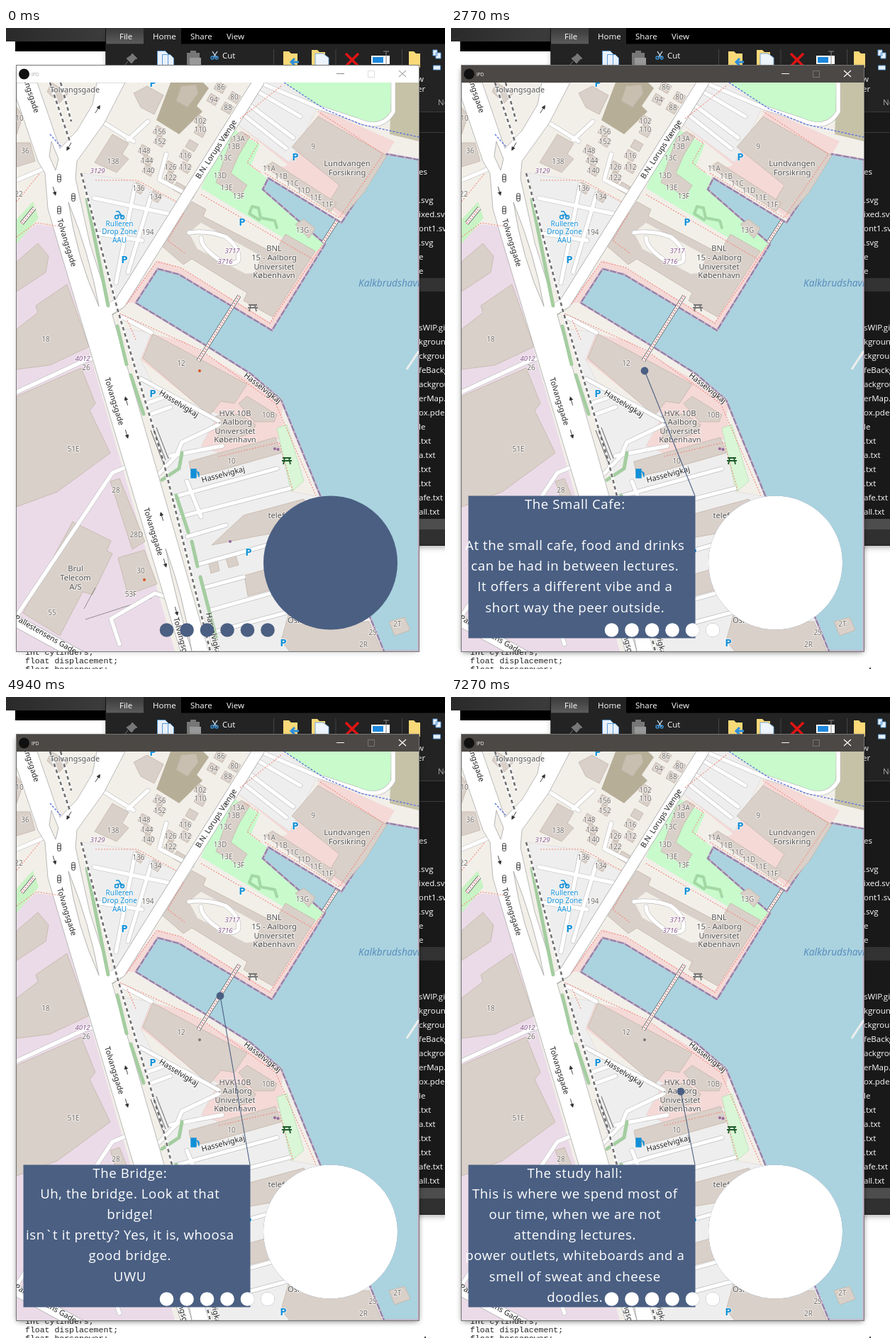
Recreate the animation shown at these times as an HTML page. Size 619 px wide and 905 px high, loop 8000 ms.

```html
<!DOCTYPE html>
<html lang="en">
<head>
<meta charset="utf-8">
<title>IPD</title>
<style>
html,body{margin:0;width:100%;height:100%;overflow:hidden;background:#fff}
svg{display:block;width:100vw;height:100vh;font-family:"Noto Sans","Open Sans",sans-serif}
.ui{font-family:"Open Sans","Noto Sans",sans-serif;font-size:11.5px;fill:#fff}
.mono{font:11.5px "Liberation Mono",monospace;fill:#222}
.b{fill:#d9d0c9;stroke:#c4b5a9;stroke-width:.8}
.park{fill:#eee;stroke:#ddd6d6;stroke-width:.6}
.pink{fill:#f4d9d7}
.line{fill:none;stroke-linejoin:round;stroke-linecap:round}
.foot{fill:none;stroke:#f3897d;stroke-width:1.1;stroke-dasharray:2 2}
.lbl text{text-anchor:middle;paint-order:stroke;stroke:#ffffffa0;stroke-width:2px;stroke-linejoin:round}
.num{font-size:10px;fill:#75706c}
.name{font-size:11.2px;fill:#555}
.street{font-size:10.8px;fill:#222}
.p{font-size:15px;font-weight:600;fill:#1090d8}
.ref{font-size:9.6px;font-style:italic;fill:#8c5a92}
.scene text{font:18.6px "Open Sans","Noto Sans",sans-serif;letter-spacing:.6px;fill:#fff;text-anchor:middle}
.on,.mark,.spot,.scene{animation:8s step-end infinite}
.on{animation-name:focus}
.mark{animation-name:mark}
.spot{animation-name:spot}
@keyframes focus{0%{opacity:0}12.375%,100%{opacity:1}}
@keyframes mark{0%{opacity:0}20.125%,100%{opacity:1}}
@keyframes spot{0%{fill:#d8541e}34.625%,100%{fill:#777}}
@keyframes cantina{0%{opacity:0}24%{opacity:1}29.875%{opacity:.5}31%,100%{opacity:0}}
@keyframes cafe{0%{opacity:0}34.625%{opacity:1}45.5%{opacity:.5}46.5%,100%{opacity:0}}
@keyframes library{0%{opacity:0}48.375%{opacity:.5}49.375%{opacity:1}58.125%{opacity:.5}59.125%,100%{opacity:0}}
@keyframes bridge{0%{opacity:0}61.75%{opacity:1}72.5%{opacity:.5}73.5%,100%{opacity:0}}
@keyframes mirror{0%{opacity:0}75.375%{opacity:1}87%{opacity:.5}88%,100%{opacity:0}}
@keyframes study{0%{opacity:0}89.875%{opacity:.5}90.875%,100%{opacity:1}}
</style>
</head>
<body>
<svg id="stage" viewBox="0 0 619 905" preserveAspectRatio="none">
<defs>
  <clipPath id="view"><rect x="15" y="77" width="567" height="803"/></clipPath>
  <filter id="soft" x="-10%" y="-10%" width="120%" height="120%"><feGaussianBlur stdDeviation="4"/></filter>
  <linearGradient id="tab" x2="0" y2="1"><stop stop-color="#3a3a3a"/><stop offset="1" stop-color="#5c5c5c"/></linearGradient>
  <linearGradient id="bar"><stop stop-color="#2a2a2a"/><stop offset="1" stop-color="#3c3c3c"/></linearGradient>
  <rect id="hut" class="b" x="-7" y="-6" width="14" height="12" transform="rotate(30)"/>
  <g id="buttons"><circle cx="457.5" cy="755" r="94.5"/></g>
  <g id="lamp" fill="#fff" stroke="#333"><rect x="-2.3" y="-5.5" width="4.6" height="11" rx="2"/><path d="M-2-1.8h4M-2 1.8h4"/></g>
  <path id="arrow" d="M0-6V3M-2.2 2L0 6.500 2.200 2z" fill="#333" stroke="#333" stroke-width=".8"/>
  <path id="table" d="M-6-4H6M-7 0H7M-3-4L-5 5M3-4L5 5" fill="none" stroke-width="1.8"/>
</defs>

<!-- desktop -->
<rect width="619" height="905" fill="#fff"/>
<rect width="141" height="19" fill="url(#bar)"/>
<rect x="13" y="19" width="128" height="14" fill="#000"/>
<g class="mono"><text x="27" y="885">int cylinders;</text><text x="27" y="897">float displacement;</text><text x="27" y="909">float horsepower;</text></g>
<rect class="mark" x="590" y="903" width="2" height="2" fill="#444"/>

<!-- file manager -->
<rect x="142" y="4" width="490" height="729" fill="#0005" filter="url(#soft)"/>
<rect x="140.500" width="479" height="731" fill="#191919"/>
<rect x="140.500" width="479" height="23" fill="#000"/>
<rect x="140.500" y="22.500" width="479" height="96" fill="#232323"/>
<rect x="141" width="53" height="22.500" fill="url(#tab)"/>
<rect x="194" width="53" height="23" fill="#232323"/>
<path d="M582 118.500h37M582 147.500h37" stroke="#3c3c3c"/>
<rect x="582" y="353" width="37" height="19" fill="#333"/>
<rect x="582" y="693" width="37" height="15" fill="#4d4d4d"/>
<rect x="582" y="708" width="37" height="22" fill="#303030"/>
<path d="M377.500 30V53M465 30V53M558.500 30V53" stroke="#454545"/>
<path d="M178 36l7 7-3 1-5 6-7-7 6-4zM172 47l-5 6" fill="#777" stroke="#777"/>
<g fill="#e9f1fa" stroke="#5c9bd6"><path d="M213.500 32.500h11l4 4V55h-15zM220.500 37.500h11l5 5V55h-16zM602 31h6v8h-6zM606 35h7v8h-7zM602.500 53h10v6h-10z"/></g>
<path d="M255 35h18v20h-18zM260 32h8v5h-8z" fill="#777"/><path d="M259 42h16v14h-16z" fill="#999"/>
<path d="M291 33l6 9M298 33l-6 9" stroke="#cfe3f4" stroke-width="1.3"/><path d="M289 42a2 2 0 104 0 2 2 0 10-4 0M295 42a2 2 0 104 0 2 2 0 10-4 0" fill="none" stroke="#3794dc" stroke-width="1.4"/>
<g fill="#f9d978"><path d="M391 33h8l3 3h9v20h-20zM431 31h8l3 3h8v20h-19zM568 33h7l3 3h6v20h-16z"/></g>
<path d="M436 36h11l8 6v14h-19z" fill="#eef4fb" stroke="#77a9d8"/><path d="M413 48h-10m4-5l-5 5 5 5" stroke="#2d8fdf" stroke-width="3" fill="none"/>
<path d="M479 36l18 18m0-18l-18 18" stroke="#e01414" stroke-width="3.600"/>
<rect x="515" y="39" width="26" height="12" fill="#fff"/><rect x="517" y="41" width="15" height="8" fill="#1b87dd"/><path d="M536 33v22M532 33h8" stroke="#888"/>
<g class="ui"><text x="160" y="16">File</text><text x="207" y="16">Home</text><text x="260" y="16">Share</text><text x="311" y="16">View</text><text x="305" y="43">Cut</text>
<text x="580" y="76">w</text><text x="580" y="90">er</text><text x="609" y="109" fill="#aaa">Ne</text></g>
<g class="ui" id="files"></g>

<!-- sketch window -->
<rect x="17" y="58" width="563" height="822" fill="#0004" filter="url(#soft)"/>
<rect class="on" x="16" y="58" width="565" height="823" fill="#0006" filter="url(#soft)"/>
<rect x="14.500" y="52.500" width="568" height="828" fill="#fff" stroke="#777"/>
<g fill="none" stroke="#888"><path d="M466 64.500h11M554 60l10 9m0-9l-10 9"/><path d="M510.500 60.500h9v9h-9z" stroke="#ddd"/></g>
<text class="ui" x="36" y="67.500" style="font-size:6.500px;fill:#aaa">IPD</text>
<g class="on"><rect x="15" y="53" width="567" height="24" fill="#4b4845"/><path d="M466 64.500h11M554 60l10 9m0-9l-10 9" stroke="#fff" stroke-width="1.200"/><path d="M510.500 60.500h9v9h-9z" fill="none" stroke="#777"/><text class="ui" x="36" y="67.500" style="font-size:6.500px">IPD</text></g>
<circle cx="25.500" cy="65" r="7.500" fill="#101010"/>

<g clip-path="url(#view)">
<rect x="15" y="77" width="567" height="803" fill="#f2efe9"/>
<!-- areas -->
<path d="M15 297L43 277 67 280 238 880H15z" fill="#ebdbe8"/>
<path d="M15 270L38 245 46 268 15 305z" fill="#c9f3c4"/>
<path d="M392 77L442 112 495 130 525 138 548 128 542 77z" fill="#c8facc"/>
<path d="M544 77H582V160L541 150z" fill="#c6c2a8"/>
<path d="M232 77H278L286 85 269 110 277 118 244 150 212 130z" fill="#b7ae98"/>
<path class="pink" d="M395 195L445 115 548 160 530 190 474 270 442 240 368 200zM322 133L345 100 430 145 400 195zM198 430L250 442 392 527 388 550 402 590 300 620 275 590 285 545 190 468zM330 760L380 745 400 800 335 805zM168 388L214 328 245 338 372 415 446 300 455 305 376 430 242 352 216 345 186 388z"/>
<path class="park" d="M109 205L176 215 248 250 213 312 163 388 152 388zM337 100L350 77H385L440 110 400 190 325 135zM168 425L205 430 190 468 210 508 300 545 275 590 300 600 385 580 405 655 445 662 533 880H292z"/>
<path d="M312 138L358 165 345 195 368 212 362 228 450 303 432 321 275 226z" fill="#c8facc"/>
<path d="M382 565L396 560 420 640 402 655z" fill="#d9f6d6" stroke="#b5dcb0" stroke-width=".7"/>
<path d="M343 262l4-10 9 2 3 14 20 4 3 10M343 262l14 9" class="line" stroke="#a3d8a4" stroke-width="4"/>
<!-- water -->
<path d="M582 186L537 178 473 275 370 212 362 228 450 305 375 427 244 348 214 340 183 388 280 447 345 488 388 525 443 660 533 880H582z" fill="#aad3df" stroke="#c9b1c9" stroke-width="3"/>
<path d="M582 186L537 178 473 275 370 212 362 228 450 305 375 427 244 348 214 340 183 388 280 447 345 488 388 525 443 660 533 880" class="line" stroke="#8f7fa6" stroke-width="2" stroke-dasharray="7 4"/>
<path d="M582 456L565 482" stroke="#eee" stroke-width="3"/>

<!-- buildings -->
<path class="b" d="M15 162H34L41 188 15 196zM15 112L24 124 15 150zM64 77L88 92 75 106 58 90zM125 190L150 150 173 163 164 178 173 185 156 204zM180 92L199 82 222 95 209 122 190 112z"/>
<path class="b" d="M247 82L268 80 271 92 256 112 240 103z" opacity=".5"/>
<g id="huts"></g>
<path class="b" d="M403 168L440 125 537 180 505 232 478 263 455 247 470 222z"/>
<path class="b" d="M365 196L376 189 466 247 458 259zM318 155L332 146 344 153 328 180 317 205 340 222 330 238 296 218zM408 277L420 270 436 283 427 297z"/>
<path class="b" d="M220 308L262 245 282 256 278 266 378 318 394 291 436 315 376 408 335 385 340 374 262 326 250 334z"/>
<path d="M258 289L275 275 360 322 350 346 338 347 270 312z" fill="#f2efe9"/>
<path class="b" d="M207 432L340 503 322 530 303 527 287 547 193 466zM328 530L340 520 382 546 378 556 350 556zM296 548L330 545 352 560 347 572 300 585zM258 612L380 578 388 600 300 625 262 634zM290 730L335 688 420 665 442 702 350 718z"/>
<path class="b" d="M286 756L298 752 301 766 289 770zM310 749L324 745 328 758 314 762zM336 773L375 762 386 790 341 802zM388 865L400 822 450 840 512 838 530 880H400zM540 838L562 832 570 850 548 858z"/>
<path class="b" d="M15 330L45 304 60 322 56 345 15 372zM15 425L45 402 42 392 86 362 117 450 62 476 15 482zM15 520L106 480 126 530 118 540 147 600 72 655 15 676zM147 640L160 636 196 725 178 736zM158 748L195 737 213 785 172 800zM24 826L94 697 148 724 142 738 150 742 122 800 108 796 76 858z"/>
<path d="M110 820L126 790 M112 835L205 805" stroke="#555" stroke-width=".6"/>

<!-- minor roads -->
<g id="lanes" class="line"></g>
<path class="line" d="M356 76L161 388 140 402" stroke="#aaa" stroke-width="17"/>
<path class="line" d="M8 834L110 890" stroke="#aaa" stroke-width="17"/><path class="line" d="M8 834L110 890" stroke="#fff" stroke-width="15.500"/>

<!-- main roads -->
<path d="M15 77H44L76 170 100 145 122 108 128 77H168L138 135 100 188 98 212 118 303 147 395 286 880H246L73 303 59 255 55 205 45 188 15 100z" fill="#fff" stroke="#aaa" stroke-width=".8"/>
<path class="line" d="M356 76L161 388 138 402" stroke="#fff" stroke-width="15.500"/>
<path d="M88 246Q118 320 131 393 100 325 88 246zM64 160l10 25-4 16-9-20zM225 735Q250 800 262 880 240 810 225 735z" fill="#f2efe9" stroke="#999" stroke-width=".7"/>

<!-- planting, tracks and paths -->
<path class="line" d="M114 242L144 392M157 421L170 475M176 490L194 545M240 660L257 712M262 725L270 760M274 775L296 860M248 600L244 622 220 638" stroke="#a4cda0" stroke-width="5"/>
<path d="M106 205L158 400 222 612 288 880M62 77L90 160M77 77L92 132" fill="none" stroke="#fff" stroke-width="4"/>
<path d="M106 205L158 400 222 612 288 880M62 77L90 160M77 77L92 132" fill="none" stroke="#707070" stroke-width="2.600" stroke-dasharray="5 4"/>
<path d="M204 568l17 44M208 566l17 44M212 564l17 44" stroke="#666" stroke-width="1"/>
<path class="foot" d="M170 390L212 330 246 338 372 417 447 305M160 403L275 455 380 530 437 660M15 295L43 275 75 280M15 245L48 205M275 235L432 326M336 150L356 162 340 190 360 205M365 205L470 268 532 178 440 118M388 82L330 128M250 262L228 300 252 318M126 215L185 215 240 245M183 440L170 410M300 605L385 585 405 655"/>
<path d="M392 77L450 115 500 136 582 154M62 150L78 168" fill="none" stroke="#5a70e0" stroke-width="1.300" stroke-dasharray="3 2"/>
<g fill="none"><path d="M329 378L271 470M467 272L447 303" stroke="#666" stroke-width="5.600"/><path d="M329 378L271 470M467 272L447 303" stroke="#fff" stroke-width="4"/><path d="M329 378L271 470M467 272L447 303" stroke="#d88" stroke-width="2" stroke-dasharray="2 2"/></g>
<path d="M22 276L40 254" stroke="#777" stroke-width="6"/><path d="M22 276L40 254" stroke="#fff" stroke-width="4"/><path d="M22 276L40 254" stroke="#e66" stroke-width="1.200" stroke-dasharray="2 2"/>

<!-- symbols -->
<use href="#lamp" x="75" y="212"/><use href="#lamp" x="95" y="239"/><use href="#lamp" x="75" y="257"/>
<g id="arrows"></g>
<use href="#table" x="348" y="395" stroke="#777"/><use href="#table" x="396" y="611" stroke="#1d5a2a"/>
<g fill="none" stroke="#1090d8" stroke-width="1.500"><circle cx="156" cy="267" r="2.500"/><circle cx="164" cy="267" r="2.500"/><path d="M155 259h4l5 8M157 264h5"/></g>
<path d="M261 623h7v12h-7zM269 626l3 2v6" fill="#1090d8" stroke="#1090d8" stroke-width="1.300"/>
<g fill="#94659c"><circle cx="379" cy="594" r="2"/><circle cx="383.500" cy="595" r="2"/><circle cx="316" cy="725" r="2"/></g>
<circle cx="195" cy="779" r="2" fill="#d8541e"/>
<circle class="spot" cx="273" cy="484" r="2"/>

<!-- labels -->
<g class="lbl">
<g class="num">
<text x="27" y="177">36</text><text x="19" y="131">10</text><text x="18" y="238">22</text><text x="151" y="192">138</text><text x="217" y="150">156</text><text x="217" y="164">152</text><text x="195" y="177">148</text><text x="199" y="191">144</text><text x="201" y="205">140</text><text x="187" y="230">136</text><text x="211" y="242">134</text><text x="253" y="184">116</text><text x="253" y="200">112</text><text x="232" y="200">126</text><text x="232" y="215">122</text><text x="274" y="135">102</text><text x="274" y="147">110</text><text x="293" y="105">94</text><text x="313" y="116">88</text><text x="303" y="87">86</text><text x="322" y="101">80</text><text x="200" y="292">194</text>
<text x="328" y="160">13A</text><text x="321" y="171">13B</text><text x="310" y="187">13C</text><text x="302" y="212">13D</text><text x="311" y="229">13E</text><text x="328" y="241">13F</text><text x="418" y="289">13G</text><text x="371" y="202">11A</text><text x="388" y="213">11B</text><text x="404" y="223">11C</text><text x="420" y="233">11D</text><text x="437" y="243">11E</text><text x="453" y="253">11F</text><text x="433" y="171">9</text>
<text x="56" y="443">18</text><text x="113" y="483">26</text><text x="95" y="598">51E</text><text x="155" y="656">28</text><text x="184" y="719">28D</text><text x="190" y="770">30</text><text x="176" y="803">53F</text><text x="65" y="829">55</text><text x="247" y="477">12</text><text x="370" y="550">10B</text><text x="318" y="615">10</text><text x="552" y="845">2T</text><text x="517" y="857">2S</text><text x="504" y="874">2R</text></g>
<g class="ref"><text x="129" y="205">3129</text><text x="319" y="318">3717</text><text x="309" y="333">3716</text><text x="108" y="470">4012</text></g>
<g class="name"><text x="481" y="195">Lundvangen</text><text x="481" y="208">Forsikring</text><text x="378" y="315">BNL</text><text x="378" y="328">15 - Aalborg</text><text x="378" y="341">Universitet</text><text x="378" y="353">København</text><text x="323" y="548">HVK 10B</text><text x="323" y="560">- Aalborg</text><text x="323" y="573">Universitet</text><text x="323" y="585">København</text><text x="98" y="767">Brul</text><text x="98" y="780">Telecom</text><text x="98" y="793">A/S</text><text x="388" y="692">telefon</text><text x="407" y="840">Osk</text><text x="97" y="91" style="font-size:10.800px">Tolvangsgade</text></g>
<g class="name" style="font-size:10px;fill:#1090d8"><text x="160" y="280">Rulleren</text><text x="160" y="291">Drop Zone</text><text x="160" y="303">AAU</text></g>
<g class="p"><text x="207" y="83">P</text><text x="408" y="187">P</text><text x="333" y="279">P</text><text x="167" y="332">P</text><text x="207" y="521">P</text><text x="342" y="745">P</text><text x="391" y="873">P</text></g>
<g class="street" id="streets"></g>
<text x="497" y="365" style="font-size:13.700px;font-style:italic;fill:#5a8dbd;text-anchor:start;stroke:none">Kalkbrudshavn</text>
</g>
</g>

<use href="#buttons" fill="#4a5f82"/>
</svg>
<script>
const $ = id => document.getElementById(id);
const put = (parent, tag, attrs, text = '') => {
  const el = document.createElementNS('http://www.w3.org/2000/svg', tag);
  for (const k in attrs) el.setAttribute(k, attrs[k]);
  el.textContent = text;
  parent.append(el);
  return el;
};

for (let i = 0; i < 6; i++) put($('buttons'), 'circle', {cx: 226.5 + 28.5 * i, cy: 850, r: 9.8});

const files = 'es,,.svg,ixed.svg,ont1.svg,.svg,e,e,,,,sWIP.gif,kground.png,ckground.png,feBackground.png,ackground.png,erMap.pde,ox.pde,le,.txt,a.txt,.txt,.txt,afe.txt,all.txt';
files.split(',').forEach((name, i) => put($('files'), 'text', {x: 582, y: 207 + 20 * i}, name));

const huts = [[216, 146], [217, 160], [195, 173], [199, 187], [201, 201], [187, 226], [211, 238], [253, 180], [253, 197], [232, 196], [232, 211], [274, 131], [274, 146], [292, 101], [312, 113], [302, 84], [322, 98], [262, 166], [244, 226]];
for (const [x, y] of huts) put($('huts'), 'use', {href: '#hut', x, y});

const lanes = [
  'M200 132L172 158M140 135L180 160M262 238L216 214 226 178M258 289Q285 285 310 295 332 312 327 329 316 337 300 327 275 310 275 296',
  'M124 240L228 262M182 222L155 360M205 235L172 345M128 290L192 300',
  'M352 88L415 125M345 110L405 155M338 125L395 170M358 77L440 112 495 130Q530 146 546 118V77',
  'M140 462L110 470 15 514M188 612L150 628 15 830M240 808L210 798 148 834 160 870M15 215L62 195',
  'M164 408L205 430M190 495L300 555M198 530L226 520M205 545L232 535M300 560L248 585 240 604 215 630M232 604L305 590',
  'M236 662L382 622M246 690L400 650M256 718L310 702M272 757L390 724M280 790L335 775M288 822L380 796M296 852L400 824M255 640L275 690'
];
for (const [stroke, width] of [['#bdbdbd', 6.6], ['#fff', 5.4]])
  for (const d of lanes) put($('lanes'), 'path', {d, stroke, 'stroke-width': width});

const arrows = [[129, 115, 212], [89, 167, 30], [68, 230, -16], [170, 527, 164], [170, 573, -16], [220, 690, 164], [224, 755, -16], [240, 823, -16]];
for (const [x, y, a] of arrows) put($('arrows'), 'use', {href: '#arrow', transform: `translate(${x} ${y}) rotate(${a})`});

const main = 'Tolvangsgade', quay = 'Hasselvigkaj';
const streets = [
  [main, 33, 86, 72], [main, 86, 303, 73], [main, 153, 527, 73], [main, 208, 711, 73], [main, 249, 866, 75],
  [quay, 244, 530, 32], [quay, 362, 508, 38], [quay, 306, 630, -15], [quay, 293, 856, 77],
  ['B.N. Lorups Vænge', 296, 171, -57], ['Pallestensens Gade', 56, 856, 30]
];
for (const [name, x, y, a] of streets) put($('streets'), 'text', {transform: `translate(${x} ${y}) rotate(${a})`, dy: 4}, name);

// Each place: marker position and the lines of its card
const places = {
  cantina: [378, 362, 'The Cantina|At AAU we have the pleasure of|eating our lunch in a nice open|space overlooking the water.|The food made here is quite good|and very healthy.'],
  cafe: [273, 484, 'The Small Cafe:||At the small cafe, food and drinks|can be had in between lectures.|It offers a different vibe and a|short way the peer outside.'],
  library: [334, 366, 'The Library:||This is were you get your books,|order home articles and more.|Books books books. whatevs,|whatevs, whatevs.'],
  bridge: [302, 422, 'The Bridge:|Uh, the bridge. Look at that|bridge!|isn`t it pretty? Yes, it is, whoosa|good bridge.|UWU'],
  mirror: [372, 552, 'The mirror room:|The mirror room has mirrors on|all sides|allowing for dance practice or just|looking at your pretty face.'],
  study: [324, 557, 'The study hall:|This is where we spend most of|our time, when we are not|attending lectures.|power outlets, whiteboards and a|smell of sweat and cheese|doodles.']
};
for (const [name, [x, y, text]] of Object.entries(places)) {
  const g = put($('stage'), 'g', {class: 'scene', style: `animation-name:${name}`});
  const blue = '#4a5f82';
  put(g, 'path', {d: `M${x} ${y}L344 660.5`, stroke: blue, 'stroke-width': 1.1});
  put(g, 'circle', {cx: x, cy: y, r: 5.4, fill: blue});
  put(g, 'rect', {x: 24.5, y: 660.5, width: 320, height: 201, fill: blue});
  text.split('|').forEach((line, i) => put(g, 'text', {x: 174.8, y: 679 + 29.1 * i}, line));
  put(g, 'use', {href: '#buttons', fill: '#fff'});
}
</script>
</body>
</html>
```
